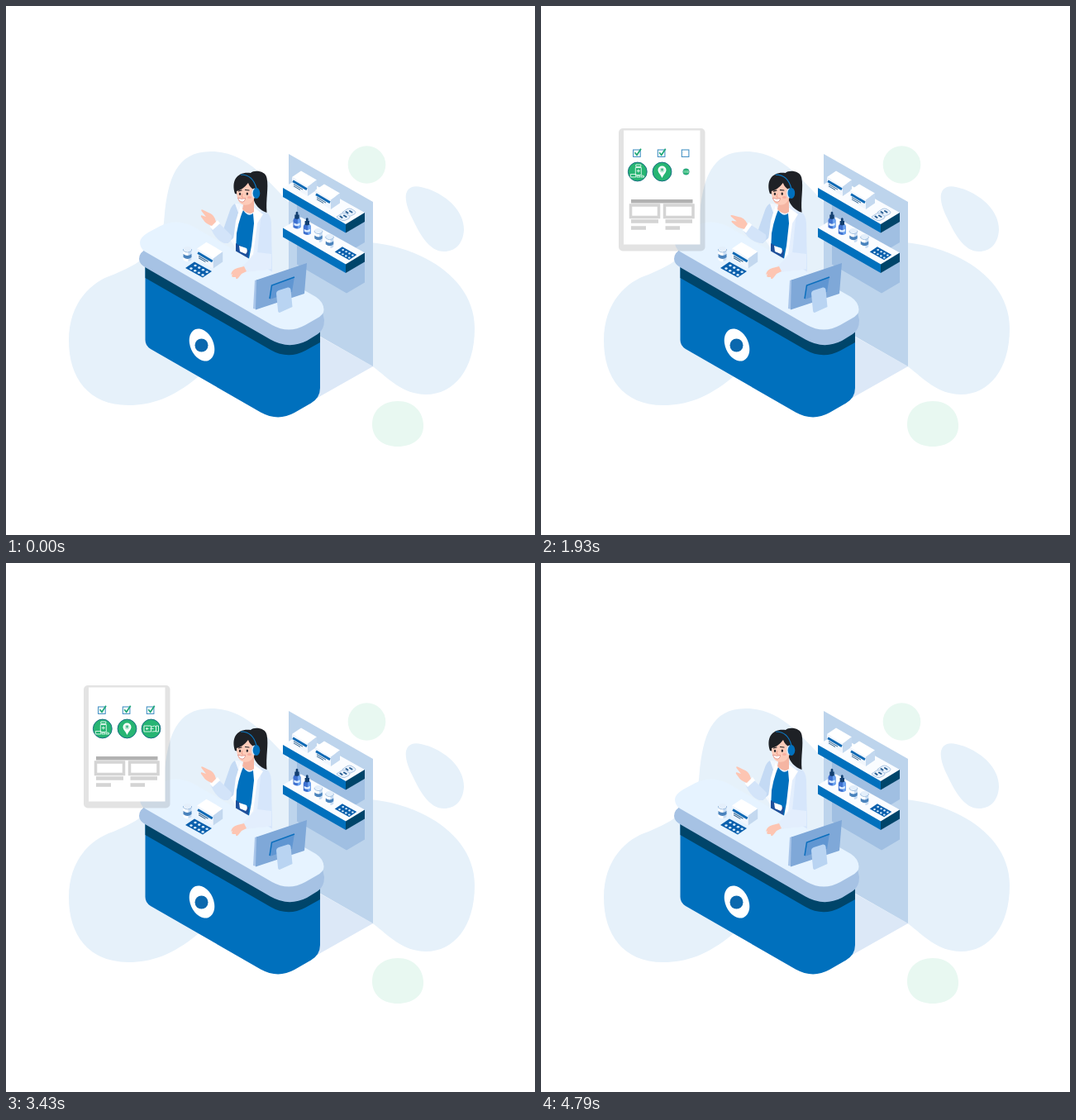
Animation of 640 by 640 pixels, one loop 4.87 s. Source, as an HTML page:

```html
<!DOCTYPE html>
<html lang="en">
<head>
<meta charset="utf-8">
<title>Pharmacy counter</title>
<style>
html, body { margin: 0; width: 100%; height: 100%; overflow: hidden; background: #fff; }
svg { display: block; width: 100%; height: 100%; }
</style>
</head>
<body>
<svg viewBox="0 0 640 640" xmlns="http://www.w3.org/2000/svg">
  <defs>
    <linearGradient id="coat" x1="0" x2="1"><stop stop-color="#f8fbff"/><stop offset="1" stop-color="#d9e8fc"/></linearGradient>
    <g id="carton">
      <path fill="#fff" d="M0 0 11-7.500 30 3.500 19 11.500Z"/>
      <path fill="#f1f6fd" d="M0 0 19 11.500V23L0 12Z"/>
      <path fill="#c3d8ef" d="M19 11.500 30 3.500V15.500L19 23Z"/>
      <path stroke="#0f69b4" stroke-width="2.800" d="M1 4.800 18 14.800"/>
      <path stroke="#33658f" stroke-width="1" d="M2 8.600 13 15.100M2 10.800 10 15.500"/>
    </g>
    <g id="blister">
      <path fill="#0a5fac" d="M-16-.5-5-8 16 3.500 5 11Z"/>
      <g id="dots" fill="#d9ecfb"></g>
    </g>
    <g id="jar">
      <path fill="#fff" d="M-5-5V7Q0 11.500 5 7V-5Z"/>
      <path fill="#c7dcf3" d="M1-3V9Q4 8.500 5 7V-4Z"/>
      <path fill="#4a83bd" d="M-5 0Q0 4 5 0V4Q0 8-5 4Z"/>
      <ellipse cy="-6" rx="5" ry="3" fill="#e4effb"/>
      <path fill="none" stroke="#a3c1e2" d="M-5-6V-4Q0 0 5-4V-6"/>
    </g>
    <g id="dropper">
      <path fill="#3d70cf" d="M-5-1Q-5-4-2-5H2Q5-4 5-1V8Q0 12-5 8Z"/>
      <path fill="#6aa2ef" d="M1-5H2Q5-4 5-1V8Q3 10 1 10Z"/>
      <path fill="#dcecff" d="M-4 2Q0 5 4 2V5Q0 8-4 5Z"/>
      <path fill="#123f70" d="M-3-9H3V-4Q0-2-3-4ZM-1.500-12Q0-14 1.500-12V-9H-1.500Z"/>
    </g>
    <g id="pack">
      <path fill="#e9f2fc" stroke="#9fbcdc" stroke-width=".8" d="M-8 0-2-4Q0-5 3-4L7-1.500Q9 0 7 2L2 4.500Q0 5-2 4L-7 1.500Z"/>
      <path stroke="#2a5f93" stroke-width="2" stroke-linecap="round" d="M-3.500-.5-1.500 1M1-1.500 3.500 0"/>
    </g>
    <g id="shelf">
      <path fill="#a0bfe2" d="M352 230 411 264 434 250V286L412 299 352 264Z"/>
      <path fill="#fafcff" d="M335 220 357 207 434 250 411 264Z"/>
      <path fill="#0070bd" d="M335 220 411 264V274.500L335 231Z"/>
      <path fill="#00456a" d="M411 264 434 250V261L411 274.500Z"/>
    </g>
  </defs>

  <!-- backdrop -->
  <path fill="#e6f1fa" d="M191 262C195 212 204 176 248 176C292 176 316 212 345 240C380 272 410 283 440 286C500 291 567 328 567 390C567 440 542 470 508 470C480 470 462 450 445 437L381 400 232 449C202 474 176 483 148 483C100 483 76 450 76 405C76 358 104 333 130 325C160 312 187 298 191 262Z"/>
  <path fill="#e6f1fa" d="M484 235C482 222 490 216 502 219C525 224 554 243 554 271C553 288 543 297 530 297C512 297 501 276 494 262C488 250 485 243 484 235Z"/>
  <circle cx="436.500" cy="192" r="22.800" fill="#e8f8f1"/>
  <path fill="#e8f8f1" d="M443 506C443 489 456 478 474 478C493 478 505 491 505 508C505 524 491 533 474 533C456 533 443 523 443 506Z"/>

  <!-- wall and shelves -->
  <path fill="#dce8f7" d="M380 400 444 436 375 475V396Z"/>
  <path fill="#bdd4ec" d="M342 179 444 237V436L342 378Z"/>
  <use href="#shelf"/>
  <use href="#carton" x="346" y="207"/>
  <use href="#carton" x="374" y="223"/>
  <use href="#pack" x="415" y="249.500"/>
  <use href="#pack" x="408" y="255"/>
  <use href="#shelf" y="48.500"/>
  <use href="#dropper" transform="translate(352 260.500) scale(.9)"/>
  <use href="#dropper" transform="translate(364.300 268) scale(.9)"/>
  <use href="#jar" transform="translate(378 277.500) scale(.95)"/>
  <use href="#jar" transform="translate(391.500 284.500) scale(.95)"/>
  <use href="#blister" transform="translate(411 298) scale(.83)"/>

  <!-- body -->
  <path fill="url(#coat)" d="M277 239 290 240 304 243Q318 247 320 258L322 322 285 304 272 284Q268 262 277 239Z"/>
  <path fill="#c4daf4" d="M277 239Q272 242 270 250L261 276Q259 285 268 287L276 280 281 250Z"/>
  <path fill="#d6e6fb" d="M309 249Q320 248 321 263L322 321 303 310Z"/>
  <path fill="#fff" d="M284 241 278 260 275 283 278 290 281 264 288 250ZM300 244 311 252 304 263 299 300 293 308 297 262Z"/>
  <path fill="#0070bd" d="M287 247Q293 256 299 251L300 263 297 290 294 306 278 298 279 275Q282 258 287 247Z"/>
  <path fill="#1d4f9a" d="M278 287 294 296 293 307 278 299Z"/>
  <path fill="#fff" d="M282 290 291 293Q293 297 290 300L283 297Z"/>

  <!-- head -->
  <g id="head">
    <path fill="#1e2126" d="M277 227C272 211 280 200 296 202C300 198 314 199 315.500 208C318 220 314 234 315.500 250C307 247 301 241 299 232Z"/>
    <path fill="#f5b5a2" d="M288 236 300 232 300 249Q294 254 286 246Z"/>
    <path fill="#fdcbb9" d="M279 224Q287 222 293 214Q295 220 301 223C302 230 299 238 294 240C289 242 283 240 281 235C279 230 279 227 279 224Z"/>
    <path fill="none" stroke="#1e2126" stroke-width="1.200" stroke-linecap="round" d="M281.500 224 285 223M289.500 222.500 294 223"/>
    <path fill="#26242a" d="M283 225.800a1.200 1.600 0 1 0 .1 0zM291.800 225.500a1.200 1.700 0 1 0 .1 0z"/>
    <path fill="none" stroke="#ee9d8a" stroke-width=".9" d="M286 227 285 231 287 231.300"/>
    <ellipse cx="294.500" cy="231.500" rx="2.500" ry="1.500" fill="#f9afa0"/>
    <path id="mouth" fill="#fff" stroke="#d46f67" stroke-width=".6" d="M-4.500-2Q0 .5 4.500-1.500Q4 3.500 0 3Q-3.500 2.500-4.500-2Z"/>
    <path fill="none" stroke="#0d78c2" stroke-width="1.200" d="M284 204Q299 204 303 221"/>
    <ellipse cx="300.500" cy="226.500" rx="3.300" ry="6" fill="#d7e9fb"/>
    <ellipse cx="303" cy="226.500" rx="4.300" ry="6.500" fill="#0070bd"/>
  </g>

  <!-- counter -->
  <path fill="#0070bd" d="M168.500 310V404Q168.500 411 175 415L308 491.500Q329 503 349 492L369 480.500Q380 474 380 462V385Z"/>
  <path fill="#00456a" d="M168.500 310V329L320 416Q341 428 362 417L380 407V385Z"/>
  <path fill="#a6c2e4" d="M170 294Q161 298 161 306Q161 312 169 316.500L320 403.500Q342 416 364 405L377 397Q385 392 385 380L383 370Z"/>
  <path fill="#e6f3ff" d="M172 274 187 266Q205 257 225 266L375 352Q384 358 384.500 367Q385 373 376 378L362 386Q342 397 322 386L168 297Q162 293 162 286Q162 280 172 274Z"/>
  <ellipse cx="237" cy="410" rx="14" ry="20.500" fill="#fff" transform="rotate(-24 237 410)"/>
  <circle cx="236.500" cy="410.500" r="8" fill="#0b68ae"/>
  <use href="#jar" x="219.500" y="300"/>
  <use href="#carton" transform="translate(231 293.500) scale(1.040)"/>
  <use href="#blister" x="233" y="317.500"/>

  <!-- monitor -->
  <path fill="#a9c5e9" d="M301 332 304 331 303 367 299 366Z"/>
  <path fill="#7fa8d8" d="M303 331.500 364 311 361 348 302 367.500Z"/>
  <path fill="#6096d2" d="M322 338 349 328 346 346 319 355Z"/>
  <path fill="none" stroke="#0b6fbd" stroke-width="1.500" d="M319 354 321.500 338 349 328"/>
  <path fill="#b9d4f2" d="M327 348Q327 345 330 344L341 340.500Q344 340 344.500 343L346.500 364 331 371Q329 371 329 368Z"/>

  <!-- resting arm -->
  <path fill="#e3eefd" d="M304 298 321 300 321 318Q314 320 306 320L290 322 286 315Z"/>
  <path fill="#fdc5b2" d="M288 315 291 321 285 324 281 329Q278 332 278 328L275 328Q272 328 274 324L272 325Q273 319 280 317Z"/>

  <!-- waving arm -->
  <g id="arm">
    <path fill="#d3e4f9" d="M255 260 247 267Q253 283 264 287Q273 288 273 278Z"/>
    <path fill="#fff" d="M256 259 259 263 250 271 246.500 267Z"/>
    <path fill="#fdc5b2" d="M254 261 249 266Q241 263 239 259L236 255Q235 252 239 254L242 255 236.500 248Q235.500 245 239 247L245 250Q252 252 254 261Z"/>
  </g>

  <!-- tablet -->
  <g id="tablet">
    <rect x="94" y="148" width="104.500" height="148.500" rx="5" fill-opacity=".11"/>
    <rect x="100" y="150.500" width="92.500" height="138" fill="#fff"/>
    <path fill="#b2b2b2" d="M109 234H183.500V238.500H109Z"/>
    <path fill="none" stroke="#d4d4d4" stroke-width="3.500" d="M108.500 241H142.500V255.500H108.500ZM149.500 241H184V255.500H149.500Z"/>
    <path stroke="#d4d4d4" stroke-width="4.500" d="M109 260.500H142M109 268.500H127M150.500 260.500H183M150.500 268.500H168"/>
    <g id="items"></g>
  </g>
</svg>
<script>
const LOOP = 4870;
const $ = id => document.getElementById(id);
const clamp = x => Math.min(1, Math.max(0, x));
const part = (t, start, length) => clamp((t - start) / length);
const ease = u => u < .5 ? 4 * u ** 3 : 1 - 4 * (1 - u) ** 3;
const easeOut = u => Math.sin(u * Math.PI / 2);
const rise = (t, start, length) => ease(part(t, start, length));

let dots = '';
for (let r = 0; r < 2; r++)
  for (let c = 0; c < 4; c++)
    dots += `<ellipse cx="${-4 + c * 4.7 - r * 5}" cy="${-3.5 + c * 2.6 + r * 3.6}" rx="1.700" ry="1.300"/>`;
$('dots').innerHTML = dots;

// Checklist columns: box, tick and badge
const items = [
  { x: 116.8, box: 300, tick: 380, pop: 450,
    art: 'M-2-8.500H4V-6H-2ZM-2.500-5H4.500V4H-2.500ZM-1-1H3M1-3V1M-8.500 3H-2V6.500H-8.500ZM-1 6.500A2 2 0 0 1 3 6.500ZM4 6.500A2 2 0 0 1 8 6.500Z' },
  { x: 146.5, box: 1130, tick: 1230, pop: 1140, pin: true,
    art: 'M-1.500-2.500H1.500M0-4V-1' },
  { x: 175.5, box: 1790, tick: 1930, pop: 1840,
    art: 'M-8.500-3.500H0V3.500H-8.500ZM-6.500 0H-3M-5-1.500V1.500M0-2 4-3.500 6-2V3L1 3.500M6-3.500H9V3.500H6ZM-1 0H3' }
];
$('items').innerHTML = items.map(({ x, art, pin }) => `
  <g class="box" transform="translate(${x - 116.8})">
    <rect x="111.600" y="174" width="8.600" height="8.400" fill="#fff" stroke="#3789c0"/>
    <path class="tick" fill="none" stroke="#20a878" stroke-width="1.700" pathLength="1" stroke-dasharray="1 2" d="M113.500 177.300 116 180.300 121 172.800"/>
  </g>
  <g class="badge">
    <circle r="11.400" fill="#27b573" stroke="#176f83"/>
    ${pin ? '<path fill="#fff" d="M0 7.500C-2 3-5 1-5-2A5 5 0 0 1 5-2C5 1 2 3 0 7.500Z"/><circle cy="-2" r="3" fill="#bfe9d5"/>' : ''}
    <path fill="none" stroke="${pin ? '#27a575' : '#e6faf1'}" stroke-width=".9" d="${art}"/>
  </g>`).join('');
const boxes = document.querySelectorAll('.box');
const ticks = document.querySelectorAll('.tick');
const badges = document.querySelectorAll('.badge');

const waves = [0, 1740, 3500];
const smiles = [[280, 860], [1300, 1700], [2450, 3050], [3750, 4150]];
const nods = [70, 1790, 2360, 3570, 4140];

function draw(t) {
  const wave = waves.reduce((sum, s) => sum + rise(t, s, 450) - rise(t, s + 640, 440), 0);
  $('arm').setAttribute('transform', `rotate(${-40 * wave} 265 282)`);

  const shut = smiles.reduce((sum, [a, b]) => sum + rise(t, a, 140) - rise(t, b, 140), 0);
  $('mouth').setAttribute('transform',
    `translate(285 ${234 - shut * .5}) scale(${1 - shut * .25} ${1 - shut * .5})`);
  const nod = nods.reduce((sum, s) => sum + Math.sin(Math.PI * part(t, s, 500)) ** 2, 0);
  $('head').setAttribute('transform', `rotate(${-.6 * nod} 294 246)`);

  const enter = part(t, 60, 420), leave = part(t, 4220, 560);
  const y = 58 * (1 - ease(enter)) - 33 * ease(leave);
  const size = 1 + .045 * (rise(t, 2430, 300) - rise(t, 2860, 400));
  $('tablet').setAttribute('transform',
    `translate(146.25 ${222.25 + y}) scale(${size}) translate(-146.25 -222.25)`);
  $('tablet').setAttribute('opacity', enter * (1 - leave ** 1.4));

  items.forEach(({ x, box, tick, pop }, i) => {
    const line = easeOut(part(t, tick, 250));
    boxes[i].setAttribute('opacity', part(t, box, 80));
    ticks[i].setAttribute('stroke-dashoffset', 1 - line);
    ticks[i].setAttribute('opacity', line > 0 ? 1 : 0);
    badges[i].setAttribute('transform',
      `translate(${x} 200.500) scale(${easeOut(part(t, pop, 420))})`);
  });
}

const start = performance.now();
function frame() {
  draw((performance.now() - start) % LOOP);
  requestAnimationFrame(frame);
}
draw(0);
requestAnimationFrame(frame);
</script>
</body>
</html>
```
